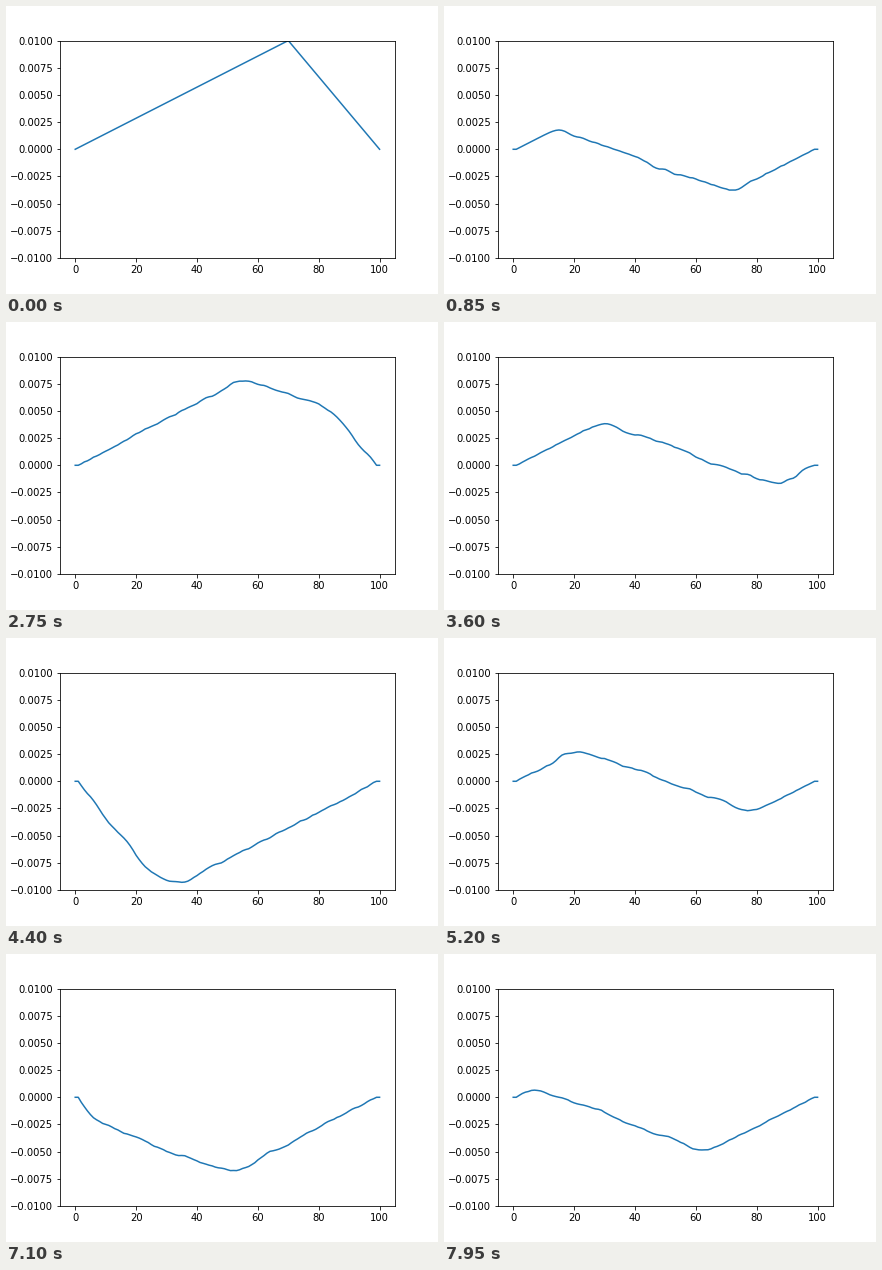
A matplotlib script for the animation above (8 s loop, 432x288 px).

```python
import matplotlib.pyplot as plt
import numpy as np
from matplotlib.animation import FuncAnimation

FRAMES = 160
INTERVAL = 50
STEPS = 10               # time steps per frame
COURANT = 0.33           # cells travelled per time step
PLUCK, HEIGHT = 70, 0.01

plt.rcParams.update({"font.family": "DejaVu Sans", "font.size": 10})


def second_diff(y):
    return y[2:] - 2 * y[1:-1] + y[:-2]


def solve_string():
    """Shapes of a plucked string, one row per frame."""
    x = np.arange(101)
    start = np.interp(x, [0, PLUCK, 100], [0, HEIGHT, 0])
    shapes = [start]

    # Once released, the string is held at the second and second-last points.
    r2 = COURANT ** 2
    prev = start.copy()
    prev[[1, -2]] = 0
    now = prev.copy()
    now[2:-2] += 0.5 * r2 * second_diff(prev[1:-1])
    for step in range(2, (FRAMES - 1) * STEPS + 1):
        new = np.zeros_like(now)
        new[2:-2] = 2 * now[2:-2] - prev[2:-2] + r2 * second_diff(now[1:-1])
        prev, now = now, new
        if step % STEPS == 0:
            shapes.append(now)
    return x, shapes


x, shapes = solve_string()

fig = plt.figure(figsize=(6, 4), dpi=72, facecolor="white")
fig.subplots_adjust(left=0.125, right=0.9, bottom=0.125, top=0.88)
ax = fig.add_subplot()
line, = ax.plot(x, shapes[0], color="#1f77b4", lw=1.5)
ax.set_xlim(-5, 105)
ax.set_ylim(-0.01, 0.01)


def update(i):
    line.set_ydata(shapes[i])
    return line,


anim = FuncAnimation(fig, update, frames=FRAMES, interval=INTERVAL,
                     repeat=True, repeat_delay=0)
plt.show()
```
